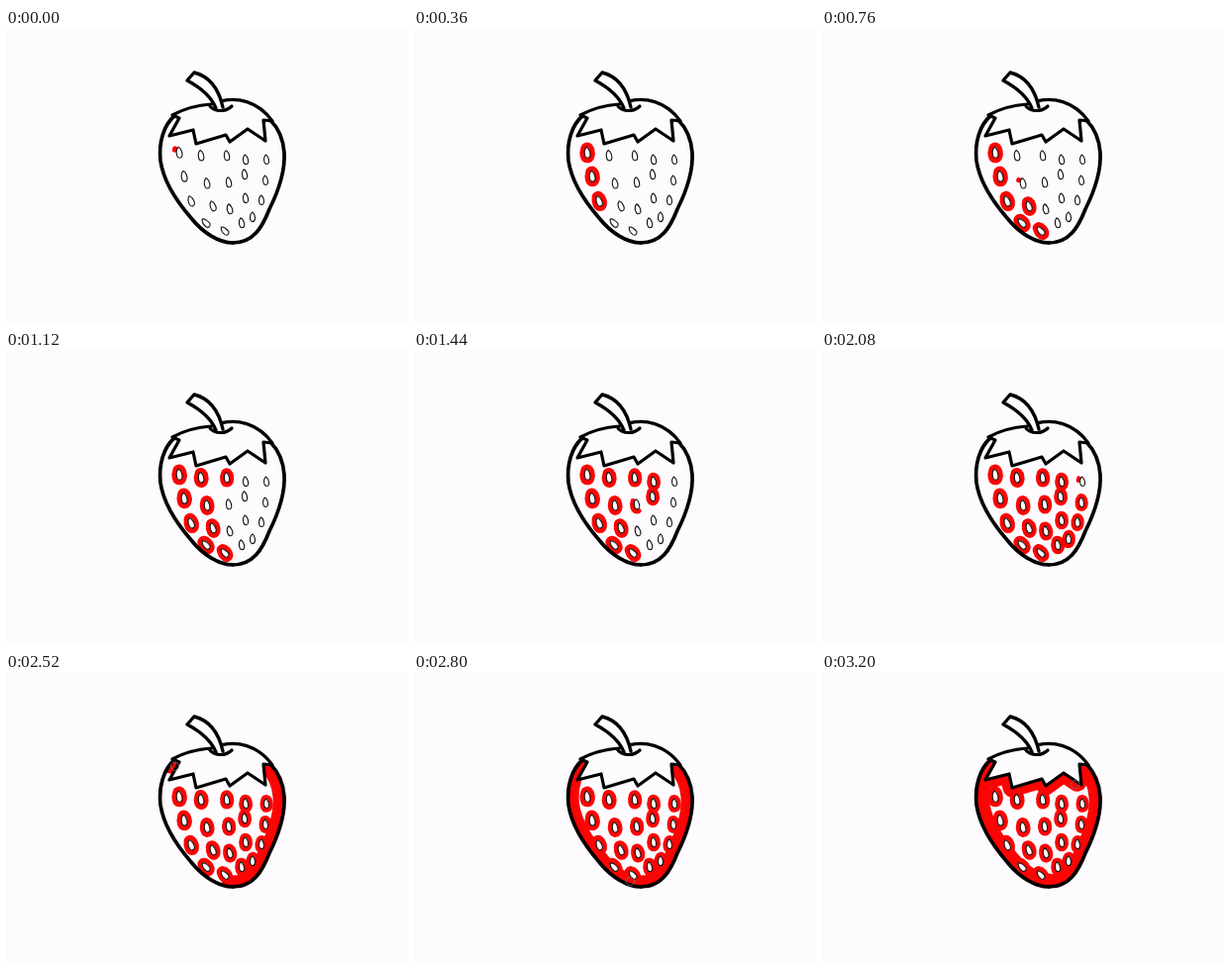
These frames come from a looping animation (406 by 297 pixels, 3240 ms). An HTML page:

```html
<!DOCTYPE html>
<html lang="en">
<head>
<meta charset="utf-8">
<title>Strawberry colouring</title>
<style>
  html, body { margin: 0; width: 100%; height: 100%; overflow: hidden; background: #fefbfe; }
  svg { display: block; width: 100vw; height: 100vh; }
  path { stroke-linecap: round; stroke-linejoin: round; }
</style>
</head>
<body>
<svg viewBox="0 0 406 297" fill="none">
  <clipPath id="inside"></clipPath>
  <g id="paint" stroke="#fc0404" clip-path="url(#inside)"></g>
  <g id="seeds" stroke="#111" stroke-width="1.1" fill="#fefbfe"></g>
  <g id="outline" stroke="#000" stroke-width="3.7"></g>
  <circle id="cursor" r="4.2" stroke="#777" stroke-width=".8"/>
</svg>
<script>
const LOOP = 3240, STEP = 40, PAPER = '#fefbfe';
const [inside, paint, seedLayer, outline, cursor] =
  ['inside', 'paint', 'seeds', 'outline', 'cursor'].map(id => document.getElementById(id));

function addPath(parent, d, attrs = {}) {
  const node = document.createElementNS('http://www.w3.org/2000/svg', 'path');
  for (const [key, value] of Object.entries({ d, ...attrs })) node.setAttribute(key, value);
  parent.append(node);
  return node;
}

// Both sides run from the leaves down to the tip; the hem runs left to right.
const leftSide = 'M171 88C159 98 154 116 156 134C159 155 174 177 187 192C199 207 215 217 229 217';
const rightSide = 'M267 93C276 102 280 112 281 126C282 144 275 165 266 183C259 201 250 217 229 217';
const hem = '165 109L189 103L192 117L222 108L226 115L244 102L262 114';

addPath(inside, leftSide + 'L240 80Z');
addPath(inside, rightSide + 'L220 80Z');
addPath(outline, leftSide);
addPath(outline, rightSide);
addPath(outline, `M168 88L175 91L${hem}L260 93L269 94C256 76 234 66 207 77C192 78 179 82 168 88Z`,
  { fill: PAPER, 'stroke-width': 3.2 });
addPath(outline, 'M212 81C208 71 198 61 183 53L190 45C206 49 215 62 219 80',
  { fill: PAPER, 'stroke-width': 3.4 });
addPath(outline, 'M206 79C211 85 222 85 228 79', { 'stroke-width': 3.2 });

// The order in which the seeds are ringed, as one walk over the fruit.
const walk = `175 126 180 150 187 175 202 197 221 205 209 180 203 157 197 129 223 129 242 133
  241 148 225 156 242 172 226 183 238 197 249 191 258 174 262 154 263 133`.match(/\d+ \d+/g);

const rings = walk.map((spot, i) => {
  const [x, y] = spot.split(' ').map(Number);
  const size = 1 - (x - 175) / 600;
  // Seeds lean towards the tip, more so lower down.
  const lean = Math.atan2(x - 240, 232 - y) * ((y - 115) / 90) ** 3 * 180 / Math.PI;
  const transform = `translate(${x} ${y}) rotate(${lean - 4}) scale(${size})`;
  addPath(seedLayer, 'M-.4 -5.8C-2.4 -4 -3.2 0 -2.5 3C-1.6 6 2 6 2.8 3C3.3 0 2 -4.5 -.4 -5.8Z',
    { transform, 'vector-effect': 'non-scaling-stroke' });
  const node = addPath(paint, 'M-4 -4.5C-6 0 -5.5 7 -1 7.8C4 8.4 5.8 3 5.3 -1C5 -6 2 -8.6 -1 -7.8C-3 -7.4 -3.6 -6 -4 -4.5',
    { transform, pathLength: 1, 'stroke-width': 5 });
  const start = 127 * i - 4 - 30 * Math.max(0, i - 11);
  return { node, start, end: start + 115 };
});

function sweep(d, width, start, end) {
  const node = addPath(paint, d, { pathLength: 1, 'stroke-width': width });
  return { node, start, end, length: node.getTotalLength() };
}

const sweeps = [
  sweep(rightSide, 23, 2270, 2500),
  sweep(leftSide, 22, 2510, 2820),
  sweep(leftSide, 27, 2820, 2960),
  sweep('M' + hem, 19, 2960, 3210)
];

const progress = ({ start, end }, t) => Math.max(0, Math.min(1, (t - start) / (end - start)));

function render(t) {
  for (const stroke of [...rings, ...sweeps]) {
    const p = progress(stroke, t);
    stroke.node.style.display = p > 0 ? '' : 'none';
    stroke.node.setAttribute('stroke-dasharray', p < 1 ? `${p} 2` : 'none');
  }
  const active = sweeps.find(s => t >= s.start && t < s.end);
  cursor.style.display = active ? '' : 'none';
  if (active) {
    // Keep the brush a little inside the line it follows.
    const point = active.node.getPointAtLength(progress(active, t) * active.length);
    cursor.setAttribute('cx', point.x + (222 - point.x) * .06);
    cursor.setAttribute('cy', point.y + (150 - point.y) * .06);
  }
}

function tick() {
  const t = performance.now() % LOOP;
  render(Math.floor(t / STEP) * STEP);
  requestAnimationFrame(tick);
}
tick();
</script>
</body>
</html>
```
